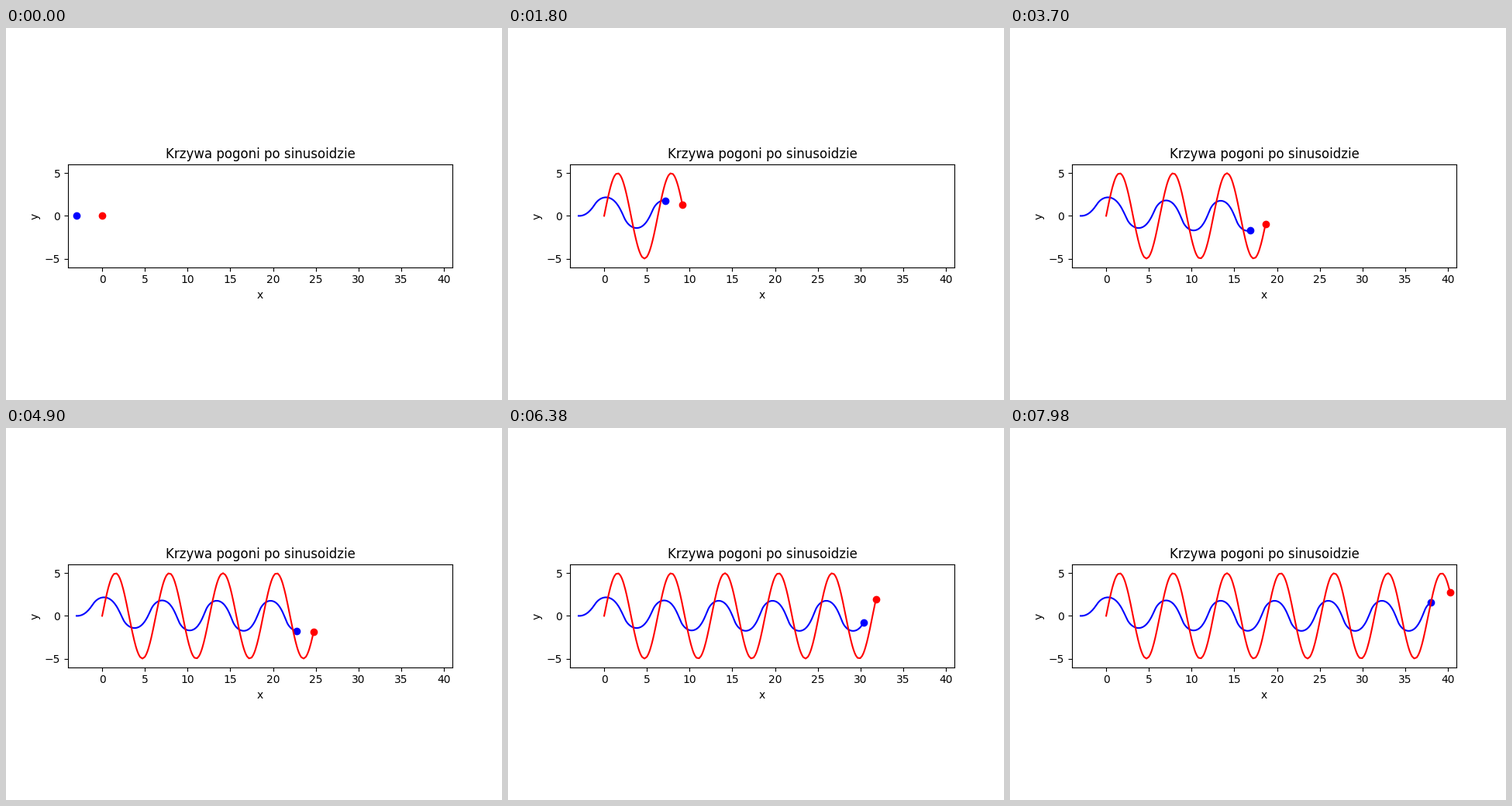
A matplotlib script that plays this animation: 640x480 px, repeating every 8000 ms.

```python
import numpy as np
import matplotlib.pyplot as plt
from matplotlib.animation import FuncAnimation

FRAMES = 400
INTERVAL = 20
AMPLITUDE = 5
RUNNER_STEP = 0.3415   # arc length per frame
CHASER_STEP = 0.16


def runner_path():
    """Constant-speed walk along y = A sin x."""
    x = np.linspace(0, 42, 42001)
    slope = np.hypot(1, AMPLITUDE * np.cos(x))
    pieces = (slope[1:] + slope[:-1]) / 2 * np.diff(x)
    arc = np.concatenate([[0], np.cumsum(pieces)])
    px = np.interp(np.arange(FRAMES) * RUNNER_STEP, arc, x)
    return np.column_stack([px, AMPLITUDE * np.sin(px)])


def chaser_path(prey, start):
    """Each step heads straight for the prey's current position."""
    path = [np.array(start, dtype=float)]
    for goal in prey[:-1]:
        gap = goal - path[-1]
        path.append(path[-1] + CHASER_STEP * gap / np.hypot(*gap))
    return np.array(path)


runner = runner_path()
chaser = chaser_path(runner, (-3, 0))

fig, ax = plt.subplots(figsize=(6.4, 4.8), dpi=100)
ax.set_xlim(-4, 41)
ax.set_ylim(-6, 6)
ax.set_aspect("equal")
ax.set_xticks(range(0, 41, 5))
ax.set_yticks([-5, 0, 5])
ax.set_xlabel("x")
ax.set_ylabel("y")
ax.set_title("Krzywa pogoni po sinusoidzie")

actors = []
for path, color in ((chaser, "b"), (runner, "r")):
    trail, = ax.plot([], [], color + "-")
    dot, = ax.plot([], [], color + "o")
    actors.append((path, trail, dot))


def update(i):
    for path, trail, dot in actors:
        trail.set_data(path[:i + 1, 0], path[:i + 1, 1])
        dot.set_data(path[i:i + 1, 0], path[i:i + 1, 1])
    return [artist for _, *pair in actors for artist in pair]


anim = FuncAnimation(fig, update, frames=FRAMES, interval=INTERVAL,
                     init_func=lambda: update(0), repeat=True, repeat_delay=0)
plt.show()
```
